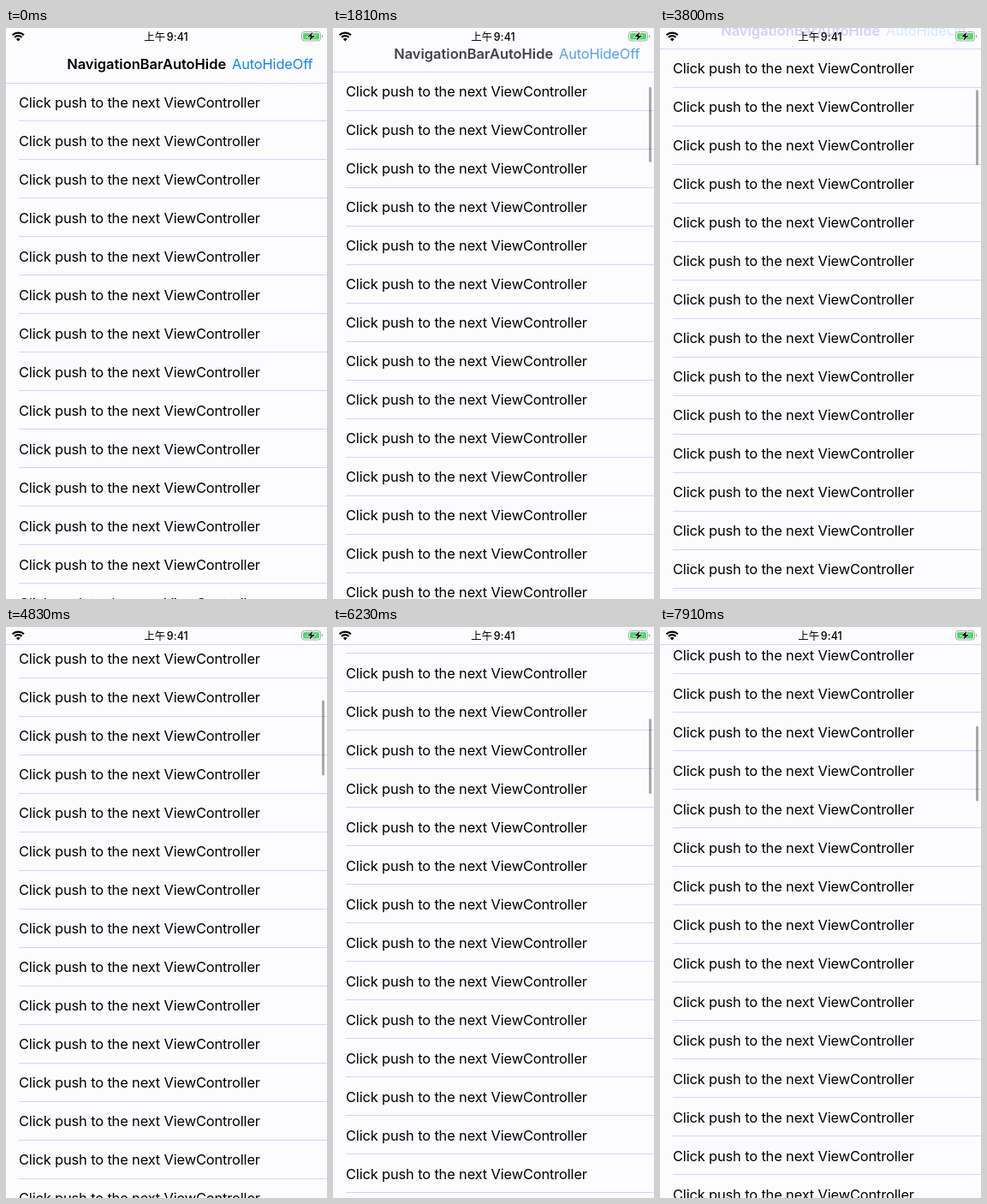
An HTML page that plays this animation: 375 px wide and 667 px high, repeating every 8000 ms.

```html
<!DOCTYPE html>
<html lang="en">
<head>
<meta charset="utf-8">
<title>Auto-hiding navigation bar</title>
<style>
html, body { margin: 0; width: 100%; height: 100%; overflow: hidden; background: #fcfcff; }
svg { display: block; width: 375px; height: 667px; }
text { font-family: Inter, "Noto Sans CJK SC", "Noto Sans CJK", "Noto Sans", sans-serif; font-size: 16.4px; letter-spacing: -0.13px; }
.title { font-weight: 600; letter-spacing: 0.03px; }
.clock { font-size: 12.4px; font-weight: 500; letter-spacing: 0.15px; }
</style>
</head>
<body>
<svg viewBox="0 0 375 667">
  <rect width="375" height="667" fill="#fcfcff"/>
  <g id="rows"></g>
  <g id="lines" fill="#d6d2fa"></g>
  <rect id="bar" width="375" fill="#fcfcff"/>
  <rect id="barLine" width="375" height="1" fill="#d6d2fa"/>
  <g id="barText">
    <text id="title" class="title" x="164.2" y="48" text-anchor="middle">NavigationBarAutoHide</text>
    <text x="264" y="48" fill="#157efb">AutoHideOff</text>
  </g>
  <rect id="thumb" x="369" width="3" height="88" rx="1.5" fill="#000" fill-opacity=".33"/>
  <g fill="none" stroke="#000" stroke-width="2.2">
    <path d="M7.6 8.3A9.4 9.4 0 0 1 20.9 8.3"/>
    <path d="M10.1 10.9A5.9 5.9 0 0 1 18.4 10.9"/>
    <path d="M14.25 15.4L11.9 12.9A3.3 3.3 0 0 1 16.6 12.9Z" fill="#000" stroke="none"/>
  </g>
  <text class="clock" x="161.3" y="14.5">上午</text>
  <text class="clock" x="187.8" y="14.5">9:41</text>
  <rect x="345.5" y="4.5" width="22" height="10.5" rx="2.8" fill="none" stroke="#a6a6aa"/>
  <rect x="347" y="6" width="19" height="7.5" rx="1.5" fill="#4cd964"/>
  <path d="M369 8v3.6q1.4-.5 1.4-1.8T369 8" fill="#a6a6aa"/>
  <path d="M358.4 4.8L352 10.3h3.9l-1.4 4.4 6.5-5.6h-4Z" fill="#000" stroke="#fcfcff" stroke-width="1.2" paint-order="stroke"/>
</svg>
<script>
const LOOP = 8000, ROW = 45, ROWS = 24, BAR_TRAVEL = 44;
const RELEASE = 4650;

const byId = id => document.getElementById(id);
const rows = byId("rows"), bar = byId("bar"), barLine = byId("barLine");
const barText = byId("barText"), title = byId("title"), thumb = byId("thumb");

function add(parent, tag, attrs, text = "") {
  const el = document.createElementNS("http://www.w3.org/2000/svg", tag);
  for (const key in attrs) el.setAttribute(key, attrs[key]);
  el.textContent = text;
  parent.append(el);
  return el;
}

const lines = [];
for (let i = 0; i < ROWS; i++) {
  add(rows, "text", { x: 15, y: 93 + i * ROW }, "Click push to the next ViewController");
  lines.push(add(byId("lines"), "rect", { x: 15, width: 360, height: 1 }));
}

// Finger drag: time, offset, speed in px per ms.
const drag = [
  [710, 0, 0.006],
  [1810, 12.5, 0.014],
  [3150, 34, 0.013],
  [3800, 39.7, 0.011],
  [RELEASE, 104, 0.21]
];

function scrollAt(t) {
  if (t <= drag[0][0]) return 0;
  // After release the list coasts with exponential decay.
  if (t >= RELEASE) return 397.5 - 293.5 * Math.exp((RELEASE - t) / 1398);
  const i = drag.findIndex(key => key[0] > t);
  const [t0, p0, v0] = drag[i - 1], [t1, p1, v1] = drag[i];
  const d = t1 - t0, u = (t - t0) / d, w = 1 - u;
  return w * w * (1 + 2 * u) * p0 + u * w * w * d * v0
       + u * u * (3 - 2 * u) * p1 - u * u * w * d * v1;
}

function draw(t) {
  const scroll = Math.round(scrollAt(t) * 2) / 2;
  const lift = Math.min(scroll, BAR_TRAVEL);
  const hidden = lift / BAR_TRAVEL;
  const edge = Math.floor(64 - lift);

  // Text sits on whole pixels.
  rows.setAttribute("transform", `translate(0 ${-Math.ceil(scroll)})`);
  lines.forEach((line, i) => line.setAttribute("y", Math.round(108 + i * ROW - scroll)));

  bar.setAttribute("height", edge);
  barLine.setAttribute("y", edge);
  barText.setAttribute("transform", `translate(0 ${-lift})`);
  barText.setAttribute("opacity", hidden < 1 ? 1 - 0.93 * hidden : 0);
  title.setAttribute("fill", `rgb(0 0 ${Math.round(255 * hidden ** 3)})`);

  thumb.setAttribute("y", 67.2 + 0.131 * scroll);
  thumb.setAttribute("opacity", Math.max(0, Math.min(1, (t - 690) / 100)));
}

const start = performance.now();
function tick() {
  draw((performance.now() - start) % LOOP);
  requestAnimationFrame(tick);
}
tick();
</script>
</body>
</html>
```
